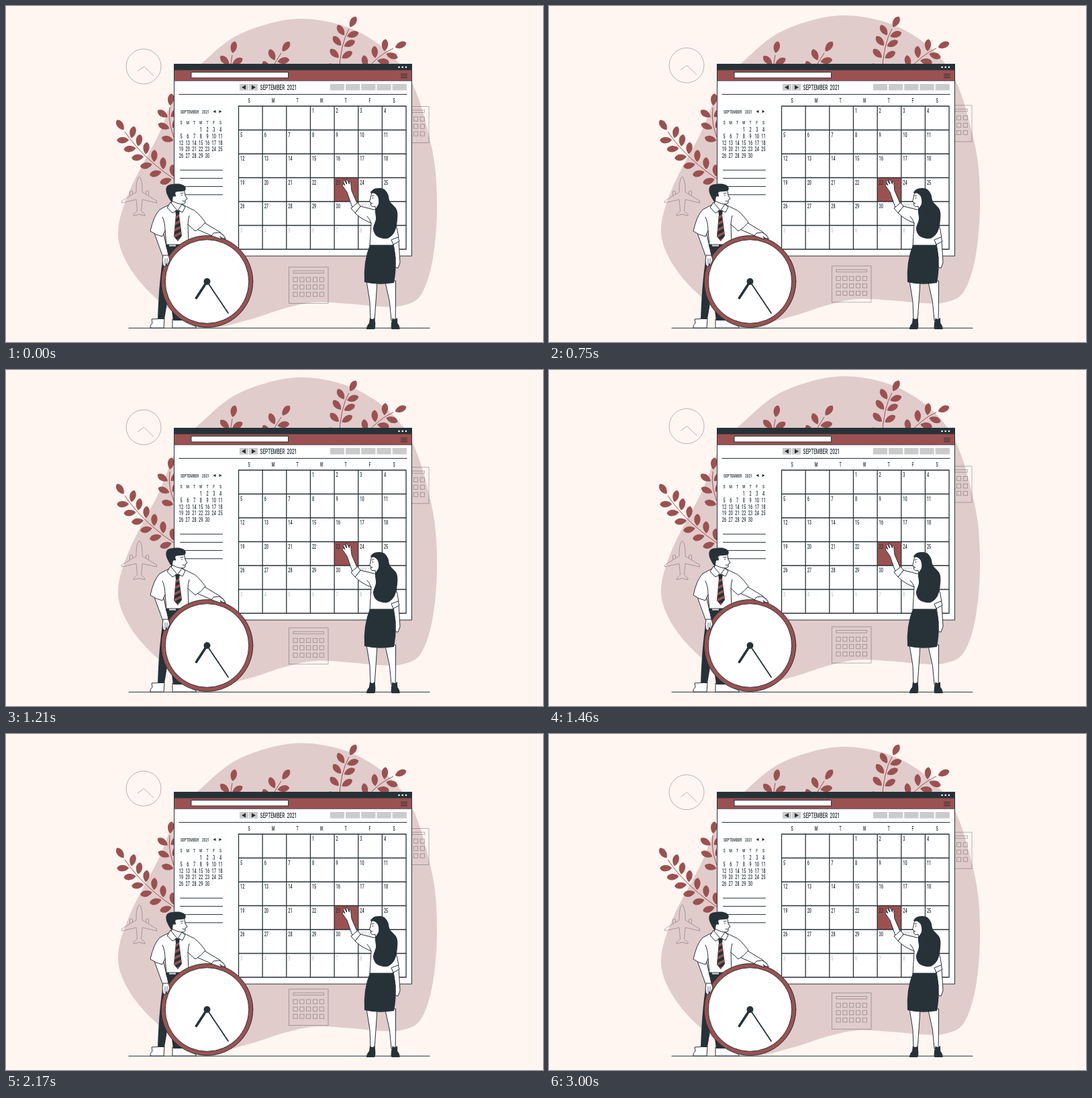
These frames come from a looping animation (800x500 px, 3.04 s). An HTML page:

```html
<!DOCTYPE html>
<html lang="en">
<head>
<meta charset="utf-8">
<title>Calendar planning</title>
<style>
  html, body { margin: 0; width: 100%; height: 100%; overflow: hidden; background: #fff6f1; }
  svg { display: block; width: 100vw; height: 100vh; }
  text { font-family: Roboto, "Liberation Sans", sans-serif; font-weight: 500; fill: #263238; }
  .pale text { fill: #c3c8c9; }
  .mid { text-anchor: middle; }
  .line { fill: none; stroke: #263238; stroke-linecap: round; }
  .skin { fill: #fff; stroke: #263238; stroke-linejoin: round; }
  .dark { fill: #263238; }
  .red { fill: #9c5151; }
  .grey { fill: #cbcbcb; }
  .stem { fill: none; stroke: #9c5151; }
  .stripe { stroke: #9c5151; stroke-width: 3.4; }
  .icon { fill: none; stroke: #263238; stroke-opacity: .42; stroke-width: .8; }
</style>
</head>
<body>
<script>
const path = (cls, d, extra = '') => `<path class="${cls}" d="${d}" ${extra}/>`;
const rect = (cls, x, y, w, h) => `<rect class="${cls}" x="${x}" y="${y}" width="${w}" height="${h}"/>`;
const circle = (cls, x, y, r) => `<circle class="${cls}" cx="${x}" cy="${y}" r="${r}"/>`;
const group = (transform, s) => `<g transform="${transform}">${s}</g>`;
const range = (n, fn) => Array.from({ length: n }, (_, i) => fn(i)).join('');
// All lettering shares one condensed face
const text = (s, x, y, size, cls = '') =>
  `<text class="${cls}" transform="translate(${x} ${y}) scale(.63 1)" font-size="${size}">${s}</text>`;

// Smooth closed curve through key points "x,y x,y ..."
function curve(cls, points, extra) {
  const p = points.trim().split(/\s+/).map(s => s.split(',').map(Number)), n = p.length;
  const at = i => p[(i + n) % n];
  const lean = (i, k) => at(i).map((v, a) => v + k * (at(i + 1)[a] - at(i - 1)[a]) / 6);
  return path(cls, `M${p[0]}` + range(n, i => `C${lean(i, 1)} ${lean(i + 1, -1)} ${at(i + 1)}`) + 'Z', extra);
}

const leaf = (x, y, turn) => path('red', 'M0 0H3C8-6 18-7 21 0C18 6 8 6 3 0Z',
  `transform="translate(${x} ${y}) rotate(${turn})"`);

// Bent stem from a to b with leaf pairs at even steps below the tip leaf
function plant(a, bend, b) {
  const STEP = 17, SPREAD = 52;
  const mix = (t, i) => (1 - t) ** 2 * a[i] + 2 * t * (1 - t) * bend[i] + t * t * b[i];
  const angle = t => Math.atan2(...[1, 0].map(i =>
    (1 - t) * (bend[i] - a[i]) + t * (b[i] - bend[i]))) * 180 / Math.PI;
  const length = Math.hypot(b[0] - a[0], b[1] - a[1]);
  const pair = k => {
    const t = 1 - (k + 1) * STEP / length;
    return [-SPREAD, SPREAD].map(s => leaf(mix(t, 0), mix(t, 1), angle(t) + s)).join('');
  };
  return path('stem', `M${a}Q${bend} ${b}`) + leaf(...b, angle(1)) + range(Math.floor(length / STEP), pair);
}

const plants =
  plant([333, 106], [334, 88], [337, 73]) +
  plant([394, 100], [401, 82], [410, 70]) +
  plant([496, 102], [498, 56], [511, 34]) +
  plant([535, 96], [556, 72], [577, 63]) +
  plant([256, 208], [240, 178], [244, 151]) +
  plant([262, 265], [206, 230], [177, 187]);

const iconCalendar = rect('icon', 421.5, 388.5, 58.5, 54) + rect('icon', 428, 394, 45.5, 3.5) +
  range(15, i => rect('icon', 428 + i % 5 * 9.8, 404 + Math.floor(i / 5) * 11, 6.2, 6.2));

const clockIcon = circle('icon', 205, 90, 26) + path('icon', 'M196 97L205.5 90L220 104');

const halfPlane = path('icon', 'M0 0Q-4.500 4-4.500 18V23L-26 36V39L-4.500 34L-3 51L-8.500 56V58L0 56M-10 26V22Q-12 20-14 22V28');
const plane = group('translate(198.5 254)', halfPlane + group('scale(-1 1)', halfPlane));

const blob = curve('', `440,19 530,41 598,102 633,205 642,290 636,375 618,430 590,446 555,447 510,443
  460,441 415,450 365,466 310,478 265,466 215,427 180,382 167,335 185,273 228,190 255,125 291,86 350,41`,
  'id="blob" fill="#e0cccb"');

const days = 'SMTWTFS', X0 = 346.5, Y0 = 149, W = 35.65, H = 35.5;

function monthGrid() {
  const label = (s, cell) => text(s, X0 + 2.5 + cell % 7 * W, Y0 + 10 + Math.floor(cell / 7) * H, 8.8);
  return rect('red', X0 + 4 * W, Y0 + 3 * H, W, H) +
    range(7, i => text(days[i], 362 + i * 36, 144.2, 8.4, 'mid')) +
    path('line', range(8, i => `M${X0 + i * W} ${Y0}v${6 * H}`) +
      range(7, i => `M${X0} ${Y0 + i * H}h${7 * W}`), 'stroke-width="1.3"') +
    range(30, i => label(i + 1, i + 3)) +
    `<g class="pale">${range(9, i => label(i ? i + 1 : 'OCT 1', i + 33))}</g>`;
}

function sidebar() {
  const col = i => 261 + i * 9.75;
  return text('SEPTEMBER', 260, 160, 7.6) + text('2021', 292, 160, 7.6) +
    path('dark', 'M308.500 157L312.500 154.700V159.300ZM321.500 157L317.500 154.700V159.300Z') +
    range(7, i => text(days[i], col(i), 175.6, 8, 'mid')) +
    range(30, i => text(i + 1, col((i + 3) % 7), 187 + Math.floor((i + 3) / 7) * 9.8, 8.8, 'mid')) +
    path('line', range(4, i => `M259.5 ${244.2 + i * 12.2}h63`));
}

const browser =
  rect('skin', 250.5, 86.5, 354, 285.5) + rect('red', 251, 95, 353, 16) + rect('dark', 250, 86, 355, 9.5) +
  path('line', 'M251 111.300H604', 'stroke-width=".8"') + rect('skin', 276, 98.5, 144.5, 8.5) +
  range(3, i => `<circle cx="${585.5 + i * 5.2}" cy="91" r="1.3" fill="#fff"/>`) +
  path('line', range(3, i => `M588.5 ${101.3 + i * 2.7}h9`)) +
  rect('grey', 348, 116, 13, 9.7) + rect('grey', 362, 116, 13, 9.7) +
  path('dark', 'M351 121L357 117.500V124.500ZM372 121L366 117.500V124.500Z') +
  text('SEPTEMBER&#160; 2021', 378.5, 124.6, 10.3) +
  range(5, i => rect('grey', 482.8 + i * 23.2, 116, 21.3, 9.5)) +
  path('line', 'M258 131.500H597', 'stroke-width="1.2"') + sidebar() + monthGrid();

const shoe = path('skin', 'M2 466L3 472Q-1 475 0 479H20L21 465Z');
const tie = `<clipPath id="tie"><path d="M252 304H259L258 311L262 342L256 350L250 343L253 311Z"/></clipPath>
  <g clip-path="url(#tie)">${rect('dark', 245, 300, 22, 54)}${
    path('stripe', range(5, i => `M245 ${319 + i * 9}l22-12`))}</g>`;

const man =
  group('translate(215 0)', shoe) + path('skin', 'M248 466V479H284Q279 473 262 466Z') +
  path('dark', 'M237 357H272V400L262 468H249L243 425L236 466H226Q228 400 237 357Z') +
  path('skin', 'M221 338L234 374L242 371L235 340Z') +
  path('skin', 'M288 318L318 336Q326 342 327 347L309 343L284 332Z') +
  path('skin', `M246 294L229 303Q220 312 215 335Q223 341 233 343L237 334L239 356H272L271 325L282 335
    Q291 330 297 322Q284 304 276 302L262 295Z`) +
  path('line', 'M237 334Q237 322 233 314M271 325Q271 318 273 312') +
  path('skin', 'M247 286L246 300L256 306L262 300V294Z') +
  path('skin', 'M250 270H265L267 282L270 287L267 289V293Q263 298 247 290Z') +
  path('line', 'M262 281v1.500M263 290l3 .5M260 279l4-.7', 'stroke-width=".9"') +
  curve('dark', '247,292 239,278 240,268 249,265 260,265 267,269 266,275 253,277 253,283 249,284') +
  path('skin', 'M245 292L240 300L248 308L255 304ZM262 295L256 304L263 307L267 299Z') + tie +
  rect('dark', 238, 354.5, 34, 4) + rect('grey', 243, 355.3, 10, 2.4);

const clock =
  circle('red', 299.5, 410, 68.3) + circle('line', 299.5, 410, 68.3) + circle('skin', 299.5, 410, 62.3) +
  circle('dark', 299.5, 410, 5) +
  path('line', 'M299.500 410L283.500 434.500', 'stroke-width="3.6"') +
  path('line', 'M299.500 410L331 457', 'stroke-width="1.8"');

const manHands =
  path('skin', 'M234 371Q232 379 234 386L237 388L239 383L240 387L244 378L242 371Z') +
  path('line', 'M237 376v8M240 376v7', 'stroke-width=".7"') +
  path('skin', 'M309 338L318 337Q325 341 327 346H323L319 343L321 347L306 342Z');

const leg = path('skin', 'M0 409L5 440L6 468H12L14 440L16 409Z');
const heel = path('dark', 'M5 464Q9 468 12 464Q14 472 13 479L12 481H0Q0 476 4 472Z');

const woman =
  group('translate(537 0)', leg + heel) +
  group('matrix(1 0 .06 1 540 0)', leg) + group('matrix(-1 0 -.08 1 625 0)', heel) +
  path('skin', 'M577 352L580 375L579 386Q581 391 584 390L587 382L585 348Z') +
  path('skin', `M516 300L508 277L501 267Q501 263 505 267L502 260Q503 257 507.500 265L506.500 258
    Q508 257 511.500 265V261Q514 261 514 266L515 275L524 296Z`) +
  path('skin', `M520 308L528 298L548 303L570 305Q582 320 585 345L576 350L577 357H542L544 323
    Q530 318 520 308Z`) +
  path('skin', 'M514 301L524 292.500L528 298L520 308ZM574 348L584 344L586 350L577 355Z') +
  path('line', 'M544 323Q542 317 538 313') +
  path('skin', 'M546 276Q543 282 543 286L541.500 291L543.500 292V296Q545 300 550 298L551 306H560V276Z') +
  path('line', 'M546.500 285v1.500M543.500 294l2.500-.5M545 282.500l3-.7', 'stroke-width=".9"') +
  curve('dark', `543,278 549,272 562,272 569,280 572,291 582,303 583,318 579,336 568,346 553,343
    547,332 551,317 550,304 555,294 554,284 549,279`) +
  path('dark', 'M542 355.500H577Q584 380 578 412Q555 416 534 411Q532 380 542 355.500Z');

document.body.innerHTML = `<svg viewBox="0 0 800 500">
  ${blob}${plane}
  <g id="icons">${clockIcon}${iconCalendar}${group('translate(150 -239)', iconCalendar)}</g>
  ${plants}${browser}
  ${path('line', 'M183 479.300H631', 'stroke-width="1.1"')}
  ${man}${clock}${manHands}${woman}
</svg>`;

const LOOP = 3040, PERIOD = 3000, DELAY = 500, LIFT = 10;
const shape = document.getElementById('blob'), icons = document.getElementById('icons');

// Linear rise and fall over one period, at rest until its delay is over
const float = t => t < 0 ? 0 : -LIFT * (1 - Math.abs(1 - 2 * t / PERIOD));

function draw() {
  const t = Math.min(performance.now() % LOOP, PERIOD);
  shape.setAttribute('transform', `translate(0 ${float(t)})`);
  icons.setAttribute('transform', `translate(0 ${float(t - DELAY)})`);
  requestAnimationFrame(draw);
}
draw();
</script>
</body>
</html>
```
